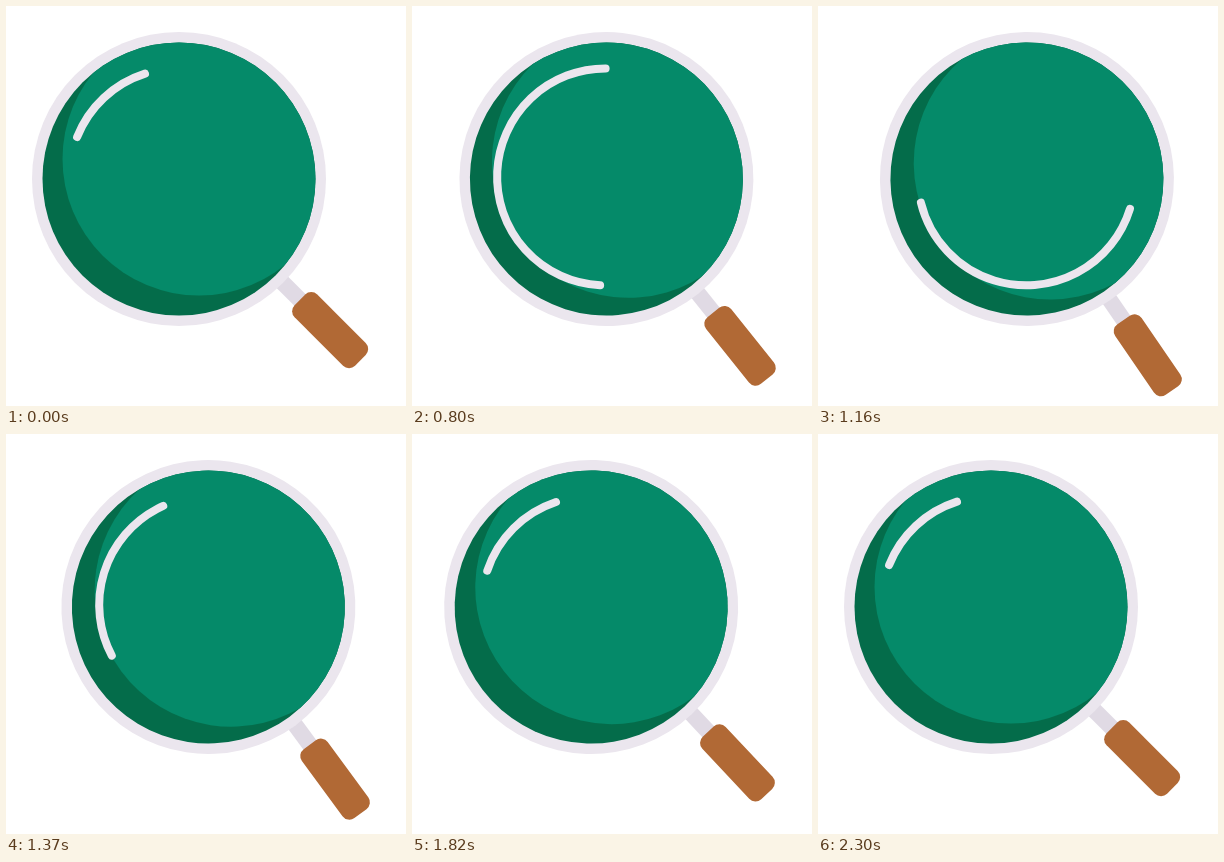
Recreate the animation shown at these times as an HTML page with a canvas. Size 400 px wide and 400 px high, loop 2.33 s.

```html
<!DOCTYPE html>
<html>
<head>
<meta charset="utf-8">
<style>
  html, body { margin: 0; height: 100%; overflow: hidden; background: #fff; }
  canvas { display: block; }
</style>
</head>
<body>
<canvas id="stage" width="400" height="400"></canvas>
<script>
const ctx = document.getElementById('stage').getContext('2d');
const LOOP = 2330, HOLD = 500, STEP = 30, RAD = Math.PI / 180;
const SHIFT = 36.7, TILT = 10.8;

// Glint ends: degrees travelled (two full turns) at each key step
const KEYS = [0, 1, 10, 22, 36, 44, 60];
const TAIL = [0, 4.6, 245, 525, 731, 715, 720];
const HEAD = [0, 6.9, 371.4, 623.4, 734, 717.5, 720];

const clamp = v => Math.min(1, Math.max(0, v));
const smooth = v => v * v * (3 - 2 * v);

// Cubic ease with handles (x1, 0) and (x2, 1)
function ease(x, x1, x2) {
  let lo = 0, hi = 1;
  for (let i = 0; i < 24; i++) {
    const u = (lo + hi) / 2, v = 1 - u;
    if (3 * v * v * u * x1 + 3 * v * u * u * x2 + u * u * u < x) lo = u; else hi = u;
  }
  return smooth(lo);
}

// Smooth curve through the keys, flat at turning points
function curve(values, n) {
  const gap = i => KEYS[i + 1] - KEYS[i];
  const rate = i => (values[i + 1] - values[i]) / gap(i);
  const slope = i => {
    if (i === 0 || i === KEYS.length - 1) return 0;
    const a = rate(i - 1), b = rate(i);
    return a * b <= 0 ? 0 : (a * gap(i) + b * gap(i - 1)) / (gap(i) + gap(i - 1));
  };
  let i = 0;
  while (i < KEYS.length - 2 && n > KEYS[i + 1]) i++;
  const h = gap(i), u = (n - KEYS[i]) / h, v = 1 - u;
  return values[i] + (values[i + 1] - values[i]) * smooth(u)
    + h * u * v * (v * slope(i) - u * slope(i + 1));
}

function disc(x, y, r, color) {
  ctx.fillStyle = color;
  ctx.beginPath();
  ctx.arc(x, y, r, 0, 2 * Math.PI);
  ctx.fill();
}

function draw(time) {
  const n = Math.max(0, Math.floor((time % LOOP - HOLD) / STEP));
  const swing = n < 18 ? smooth(n / 18) : 1 - ease(clamp((n - 18) / 42), 0.4, 0.36);

  ctx.fillStyle = '#fff';
  ctx.fillRect(0, 0, 400, 400);
  ctx.save();
  ctx.translate(173 + SHIFT * swing, 173);
  ctx.rotate(TILT * swing * RAD);

  // Neck and handle
  ctx.save();
  ctx.rotate(45 * RAD);
  ctx.fillStyle = '#e0dae4';
  ctx.fillRect(140, -8, 40, 16);
  ctx.fillStyle = '#b16935';
  ctx.beginPath();
  ctx.roundRect(171, -16, 85.5, 32, 8.5);
  ctx.fill();
  ctx.restore();

  // Rim and shaded glass
  disc(0, 0, 147, '#ebe6ee');
  disc(0, 0, 136.5, '#046c4a');
  ctx.save();
  ctx.beginPath();
  ctx.arc(0, 0, 136.5, 0, 2 * Math.PI);
  ctx.clip();
  disc(20, -20, 136.5, '#058a69');
  ctx.restore();

  // Glint
  ctx.strokeStyle = '#ebe6ee';
  ctx.lineWidth = 8;
  ctx.lineCap = 'round';
  ctx.beginPath();
  ctx.arc(-1, -2, 108.5, (201.6 + curve(TAIL, n)) * RAD, (252.3 + curve(HEAD, n)) * RAD);
  ctx.stroke();
  ctx.restore();
}

function tick() {
  draw(performance.now());
  requestAnimationFrame(tick);
}
tick();
</script>
</body>
</html>
```
